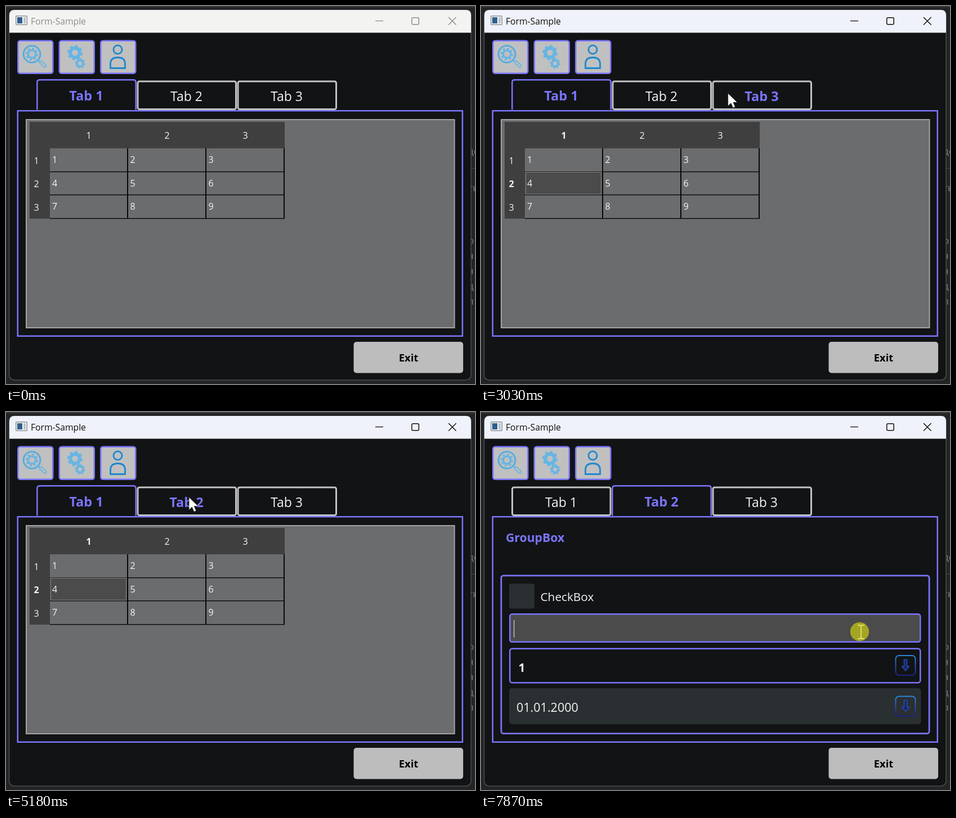
These frames come from a looping animation (833 by 672 pixels, 8 s). An HTML page:

```html
<!DOCTYPE html>
<html lang="en">
<head>
<meta charset="utf-8">
<title>Form-Sample</title>
<style>
  html, body { margin: 0; width: 100%; height: 100%; overflow: hidden; background: #222426; }
  svg { display: block; width: 833px; height: 672px; font-family: "Open Sans", "Noto Sans", sans-serif; }
</style>
</head>
<body>
<svg id="stage" viewBox="0 0 833 672"></svg>
<script>
const LOOP = 8000;
const ACCENT = '#7a75fb', DARK = '#121315', GREY = '#c0c0c0', FIELD = '#2a2f32';
const stage = document.getElementById('stage');

// Each move: first step time, last step time, number of steps, goal x, goal y, ease-out power
const START = [833, 430];
const MOVES = [
  [460, 930, 8, 160.5, 272.5, 1.6],
  [1270, 1340, 2, 149, 317, 1],
  [1930, 2350, 7, 157.5, 137, 1.82],
  [2550, 3240, 10, 513, 160, 1.3],
  [3510, 3840, 6, 170, 115.5, 1],
  [3910, 4050, 3, 127, 104, 1.5],
  [4190, 4510, 5, 186, 103, 1.3],
  [4720, 5180, 7, 325, 151.5, 1.4],
  [5780, 6120, 6, 75, 337, 1.5],
  [6320, 6320, 1, 73.5, 330, 1],
  [6860, 6930, 2, 75, 329.5, 1],
  [7400, 7600, 4, 675, 391, 1.5]
];
// Mouse button down: from, to
const PRESSES = [[990, 1130], [1540, 1730], [5510, 5580], [6390, 6530], [7130, 7265], [7870, 8000]];

const within = (t, a, b) => t >= a && t < b;

function pointer(t) {
  let [x, y] = START;
  for (const [from, to, steps, gx, gy, power] of MOVES) {
    if (t < from) break;
    const step = to > from ? Math.floor((t - from + 6) / (to - from) * (steps - 1)) + 1 : steps;
    const p = 1 - (1 - Math.min(1, step / steps)) ** power;
    x += (gx - x) * p;
    y += (gy - y) * p;
  }
  return { x, y };
}

const rect = (x, y, w, h, fill, extra = '') =>
  `<rect x="${x}" y="${y}" width="${w}" height="${h}" fill="${fill}" ${extra}/>`;
const box = (x, y, w, h, r, color, width, fill = 'none') =>
  rect(x + width / 2, y + width / 2, w - width, h - width, fill, `rx="${r}" stroke="${color}" stroke-width="${width}"`);
const path = (d, color, width, fill = 'none', extra = '') =>
  `<path d="${d}" fill="${fill}" stroke="${color}" stroke-width="${width}" ${extra}/>`;
const ring = (x, y, r, color, width, extra = '') =>
  `<circle cx="${x}" cy="${y}" r="${r}" fill="none" stroke="${color}" stroke-width="${width}" ${extra}/>`;
const text = (s, x, y, size, fill = '#f5f5f5', weight = 400, anchor = 'start') =>
  `<text x="${x}" y="${y}" font-size="${size}" fill="${fill}" font-weight="${weight}" text-anchor="${anchor}">${s}</text>`;

const gear = (x, y, r, color, body) =>
  ring(x, y, r * 0.62, color, body) +
  ring(x, y, r * 0.9, color, r * 0.25, 'pathLength="16" stroke-dasharray="1"');

function backdrop() {
  const scraps = [['до', 264], ['ть', 329], ['о', 423], ['я', 450], ['я', 477], ['д', 504], ['л', 531]];
  return rect(0, 0, 833, 672, '#222426') + rect(0, 0, 833, 2, '#3a3c3e') +
    rect(824, 288, 9, 1, '#4a4b4d') +
    scraps.map(([s, y]) => text(s, 821, y, 17, '#7d7e80')).join('');
}

function frame(active) {
  const ink = active ? '#111' : '#8d8d8d';
  return rect(5.5, 7.5, 820.5, 657.5, DARK, 'rx="9" stroke="#4b4d4f" stroke-width="1.5"') +
    path('M6 47.5V16Q6 7 15 7H817Q826 7 826 16V47.5Z', 'none', 0, active ? '#eff2fa' : '#f3f3f1') +
    box(17, 17, 21, 17, 1, '#8a8f94', 1.5, '#f8f8f8') +
    rect(20, 20, 9, 11, '#2d5f8c') + rect(31, 20, 4, 11, '#b9c3cb') +
    text('Form-Sample', 44, 32.5, 15.7, ink) +
    path('M656 26.5H670', ink, 1.3) + box(720, 20, 14, 13.5, 2, ink, 1.5) +
    path('M786 20L799.500 33.500M799.500 20L786 33.500', ink, 1.5);
}

function toolbar() {
  const sky = '#67b5e3', blue = '#1c88cf';
  return [20, 93.5, 167].map(x => box(x, 60.5, 64.5, 60.5, 4, ACCENT, 2.5, GREY)).join('') +
    ring(46, 85.5, 15, sky, 3.2) + ring(46, 85.5, 15, blue, 0.5) + gear(46, 85.5, 11, sky, 3.5) +
    path('M57 96L61 100', sky, 3) +
    path('M62 100L69 106.500', sky, 6.5, 'none', 'stroke-linecap="round"') +
    path('M62 100L69 106.500', GREY, 3, 'none', 'stroke-linecap="round"') +
    gear(122.5, 83, 13.3, sky, 6) + gear(131.5, 102, 9, sky, 4) +
    ring(198.5, 77.5, 7.6, blue, 2.8) +
    path('M185.500 110.500V103Q185.500 91.500 198.500 91.500T211.500 103V110.500Z', blue, 2.8);
}

function tabs(current, hovered) {
  return [[54, 178], [232, 178], [410, 178]].map(([x, w], i) => {
    const on = i === current, lit = on || i === hovered;
    const edge = on
      ? rect(x, 129, w, 56, DARK) +
        path(`M${x + 1.3} 184.500V136Q${x + 1.3} 131.300 ${x + 6} 131.300H${x + w - 6}Q${x + w - 1.3} 131.300 ${x + w - 1.3} 136V184.500`, ACCENT, 2.5)
      : box(x + (i ? 0.5 : 0), 132.5, w - 0.5, 52.5, 3, '#c3c3c3', 3);
    return edge + text(`Tab ${i + 1}`, x + w / 2 - 0.5, on ? 167.5 : 168.5, lit ? 23.5 : 23,
      lit ? ACCENT : '#f5f5f5', lit ? 700 : 400, 'middle');
  }).join('') + box(19.5, 185, 792.5, 403, 0, ACCENT, 2.5);
}

function tablePage(row) {
  let out = box(35, 201, 762.5, 372, 0, '#a3a3a3', 2, '#6b6c6e') +
    rect(42, 206, 453, 47, '#3f3f3f') + rect(42, 253, 36, 125, '#3f3f3f');
  for (let i = 0; i < 3; i++) {
    const x = 78 + 139 * i, y = 253 + 41.7 * i;
    out += rect(x + 137, 253, 2, 125, '#080808') + rect(78, Math.round(y + 40.6), 417, 1.4, '#080808') +
      text(i + 1, x + 69, 236, 16, '#f5f5f5', row >= 0 && i === 0 ? 700 : 400, 'middle') +
      text(i + 1, 54, y + 27.5, 16, '#f5f5f5', row === i ? 700 : 400, 'middle');
    if (row === i) {
      out += rect(78, y, 137, 40.5, '#4b4b4b') +
        rect(79.5, Math.round(y) + 0.5, 134, 39, 'none', 'stroke="#c4c4c4" stroke-dasharray="1 1"');
    }
    for (let c = 0; c < 3; c++) out += text(i * 3 + c + 1, 82 + 139 * c - (c ? 0.5 : 0), y + 26, 16);
  }
  return out;
}

function dropButton(y) {
  return box(735.5, y, 37, 37, 6, 'url(#drop)', 2) +
    path(`M751.500 ${y + 8}H756.500V${y + 20}H760.500L754 ${y + 28}L747.500 ${y + 20}H751.500Z`,
      '#2549b5', 1.6, '#152660', 'stroke-linejoin="round"');
}

function formPage(checked, focused) {
  return `<defs><linearGradient id="drop" x2="0" y2="1"><stop stop-color="#2b86d4"/><stop offset="1" stop-color="#1c2080"/></linearGradient></defs>` +
    text('GroupBox', 44, 231, 21.2, ACCENT, 700) +
    box(34.5, 289.5, 763, 283.5, 4, ACCENT, 2.8) +
    rect(50, 305, 45, 44.5, checked ? ACCENT : FIELD, 'rx="4"') +
    text('CheckBox', 105.5, 335.5, 20.8) +
    box(50, 358, 731.5, 52, 4, ACCENT, 2.5, focused ? '#4b4b4b' : '#3f3f3f') +
    (focused ? rect(58, 370, 1.3, 31, '#c8c8c8') : '') +
    box(50, 419.5, 731.5, 63, 4, ACCENT, 2.5) + text('1', 66.5, 462, 21, '#fff', 700) + dropButton(432) +
    rect(50, 491, 731.5, 64, FIELD, 'rx="5"') + text('01.01.2000', 63, 532.5, 21.5) + dropButton(504.5);
}

function cursor({ x, y }, beam, pressed) {
  const bar = 'M-6-12H-2Q0-12 0-10Q0-12 2-12H6M0-10V10M-6 12H-2Q0 12 0 10Q0 12 2 12H6';
  const arrow = 'M0 0V22.500L5.300 17.500L8.800 25.800L12.800 24.200L9.300 16H16.300Z';
  const shape = beam ? path(bar, '#e8e8e8', 1.5) : path(arrow, '#1a1a1a', 0.7, '#fff');
  const halo = `<circle cx="${beam ? -2.5 : 0}" cy="${beam ? -0.5 : 0.5}" r="16.700" fill="#ff0" fill-opacity=".5"/>`;
  return `<g transform="translate(${x.toFixed(1)} ${y.toFixed(1)})">${shape}${pressed ? halo : ''}</g>`;
}

function scene(t) {
  const p = pointer(t);
  const form = t >= 5510;
  const overTabs = t >= 460 && within(p.y, 132, 185) && within(p.x, 54, 588);
  const hovered = overTabs ? Math.floor((p.x - 54) / 178) : -1;
  const beam = form && within(p.x, 50, 781) && within(p.y, 358, 410);
  const pressed = PRESSES.some(([a, b]) => within(t, a, b));
  const row = t < 990 ? -1 : t < 1540 ? 0 : 1;
  return backdrop() + frame(t >= 990) + toolbar() + tabs(form ? 1 : 0, hovered) +
    (form ? formPage(within(t, 6530, 7265), t >= 7870) : tablePage(row)) +
    rect(617.5, 597, 194.5, 55.5, '#bdbdbd', 'rx="5"') + text('Exit', 715, 632, 18.3, '#000', 700, 'middle') +
    (t >= 460 ? cursor(p, beam, pressed) : '');
}

let shown = '';
const begin = performance.now();
function draw() {
  const next = scene((performance.now() - begin) % LOOP);
  if (next !== shown) stage.innerHTML = shown = next;
  requestAnimationFrame(draw);
}
draw();
</script>
</body>
</html>
```
